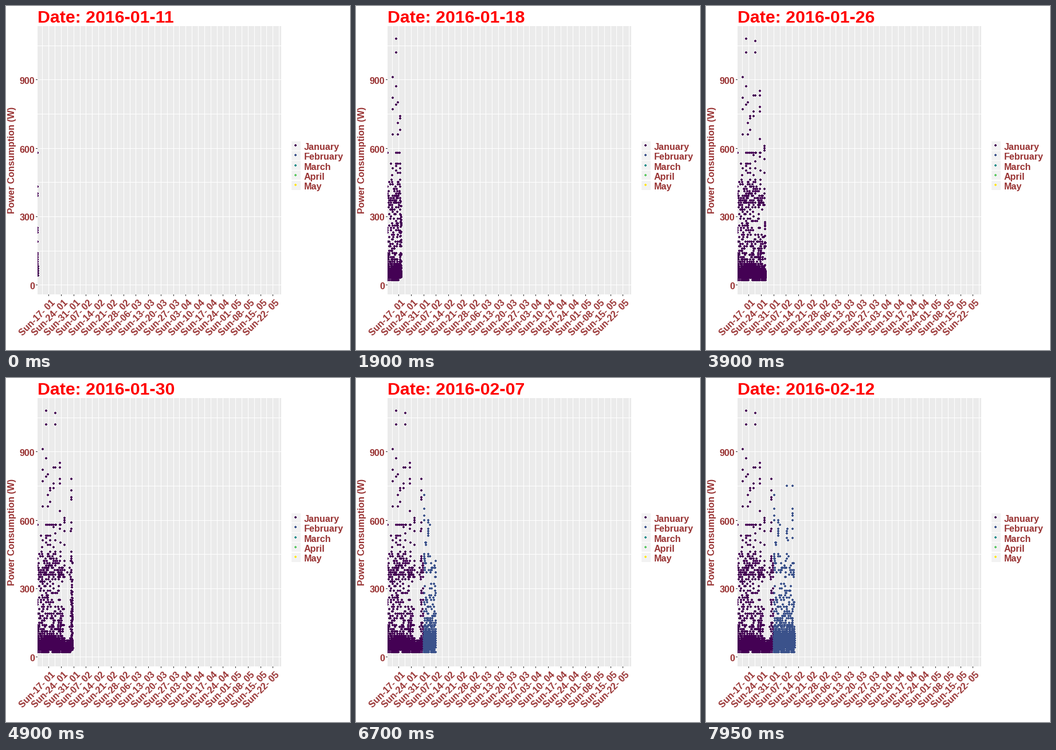
A matplotlib script for the animation above (8 s loop, 600 by 600 pixels).

```python
import numpy as np
import matplotlib.pyplot as plt
from matplotlib.animation import FuncAnimation
from matplotlib.patches import Rectangle
from matplotlib.path import Path

plt.rcParams["font.family"] = "Liberation Sans"
plt.rcParams["font.weight"] = "bold"

SIZE, DPI = 600, 72                 # one point equals one pixel
LEFT, RIGHT, TOP, BOTTOM = 55, 480, 35, 503
START_X, DAY_PX = 55.3, 3.103       # first reading, pixels per day
START_HOUR = 17                     # hour of the first reading
DAYS, FEB = 33, 21
FIRST = np.datetime64("2016-01-11")
TICK_FRAMES, HEAD = 5, 0.6          # frames per day, reach of the moving head
BROWN = "#993333"
MONTHS = {"January": "#440154", "February": "#3B528B", "March": "#21908C",
          "April": "#5DC863", "May": "#FDE725"}

# Highest spikes, as pixel column: watts
PEAKS = {64: 910, 70: 1080, 73: 800, 77: 740, 83: 830, 86: 1070, 94: 850,
         102: 610, 114: 780, 119: 710, 126: 600, 141: 750, 151: 750}


def x_at(days):
    return START_X + DAY_PX * (days - START_HOUR / 24)


def y_at(watts):
    return 486.7 - 0.3977 * np.asarray(watts)


def day_of(x):
    return int((x - START_X) / DAY_PX + START_HOUR / 24)


def activity(day):
    """Household liveliness, with a quiet spell in late January."""
    return np.interp(day, [10, 11, 12, 13, 15, 16, 18, 19, 32],
                     [1, .4, 1.1, 1.1, .4, .08, .08, 1, .85])


def cascade(x, top, rng):
    """A spike and the smaller ones below it in the same column."""
    below = 420 + (top - 420) * rng.random(6) ** 1.5
    return [(x, v) for v in (top, *below.round(-1))]


def readings(day, rng):
    """Columns x, watts of one day, ordered by time."""
    if day == 0:
        watts = np.r_[580, 430, 400, 390, 250:220:-10, 190, 140:30:-10]
        hours = np.linspace(START_HOUR, 24, len(watts))
        return np.column_stack([x_at(hours / 24), watts])
    january, n = day < FEB, 144
    base, spread, kettle, tail = (43, 11, .35, 130) if january else (58, 19, .12, 110)
    hours = np.arange(n) * 24 / n
    busy = activity(day) * (0.03 + 0.55 * np.exp(-((hours - 10) / 3) ** 2)
                            + np.exp(-((hours - 18.5) / 2.6) ** 2))
    low = rng.normal(base, spread, n) + 40 * busy * np.abs(rng.normal(size=n))
    high = np.where(rng.random(n) < kettle, rng.normal(380, 28, n),
                    105 + rng.exponential(tail, n))
    watts = np.where(rng.random(n) < 0.45 * busy, high, low)
    watts = np.clip(watts.round(-1), 20, 580)
    rows = list(zip(x_at(day + hours / 24), watts))
    for x, top in PEAKS.items():
        if day_of(x) == day:
            rows += cascade(x, top, rng)
    return np.array(sorted(rows))


rng = np.random.default_rng(11)
data = [readings(d, rng) for d in range(DAYS)]


def head(day):
    """Readings on their way from one day to the next."""
    if day + 1 in (FEB, DAYS):
        return np.empty((0, 2))
    a, b = data[day], data[day + 1]
    n = min(len(a), len(b))
    return (1 - HEAD) * a[-n:] + HEAD * b[-n:]


fig = plt.figure(figsize=(SIZE / DPI, SIZE / DPI), dpi=DPI, facecolor="white")
ax = fig.add_axes([0, 0, 1, 1])
ax.set(xlim=(0, SIZE), ylim=(SIZE, 0))
ax.axis("off")


def box(x, y, w, h, color):
    return ax.add_patch(Rectangle((x, y), w, h, fc=color, lw=0))


def rule(xs, ys, color):
    ax.plot(xs, ys, color=color, lw=1, snap=False, solid_capstyle="butt")


def text(x, y, s, size=16, color=BROWN, **kw):
    kw = {"ha": "left", "va": "baseline", "rotation_mode": "anchor", **kw}
    return ax.text(x, y, s, size=size, color=color, **kw)


DOT = Path([(-2, -1), (-1, -1), (-1, -2), (1, -2), (1, -1), (2, -1), (2, 1),
            (1, 1), (1, 2), (-1, 2), (-1, 1), (-2, 1), (-2, -1)])


def dots(xs, ys, color):
    return ax.plot(xs, ys, ls="", marker=DOT, ms=4, mew=0, color=color,
                   zorder=3)[0]


panel = box(LEFT, TOP, RIGHT - LEFT, BOTTOM - TOP, "#EBEBEB")

for watts in range(0, 1051, 150):
    y = np.floor(y_at(watts)) + 0.5
    rule([LEFT, RIGHT], [y, y], "white")
    if watts % 300 == 0:
        rule([LEFT - 3, LEFT], [y, y], "#333333")
        text(50, y + 7, str(watts), ha="right")

for half in range(-1, 38):
    x = np.floor(x_at(7 + 3.5 * half)) + 0.5
    rule([x, x], [TOP, BOTTOM], "white")
    if half % 2 == 0:
        rule([x, x], [BOTTOM, BOTTOM + 3], "#333333")
        _, month, day = str(FIRST + 6 + 7 * (half // 2)).split("-")
        text(x - 45.5, 576.5, f"Sun-{day}- {month}", rotation=45)

text(15, 268.5, "Power Consumption (W)", rotation=90, ha="center")
title = text(55, 29, "", size=30.4, color="red")

for i, (name, color) in enumerate(MONTHS.items()):
    y = 236 + 17.28 * i
    box(498, np.floor(y), 16, 16, "#F2F2F2")
    dots([505], [y + 7], color)
    text(520, y + 15, name)

series = [dots([], [], MONTHS[m]) for m in ("January", "February")]
for s in series:
    s.set_clip_path(panel)


def draw(frame):
    day = (frame + 1) // TICK_FRAMES
    shown = data[:day + 1]
    parts = [shown[:FEB], shown[FEB:]]
    if frame % TICK_FRAMES == 3:
        parts[day >= FEB].append(head(day))
    for s, part in zip(series, parts):
        pts = np.concatenate([np.empty((0, 2)), *part])
        s.set_data(np.floor(pts[:, 0]), np.floor(y_at(pts[:, 1])))
    title.set_text(f"Date: {FIRST + day}")
    return [*series, title]


anim = FuncAnimation(fig, draw, frames=160, interval=50, repeat=True,
                     repeat_delay=0, blit=False)
plt.show()
```
